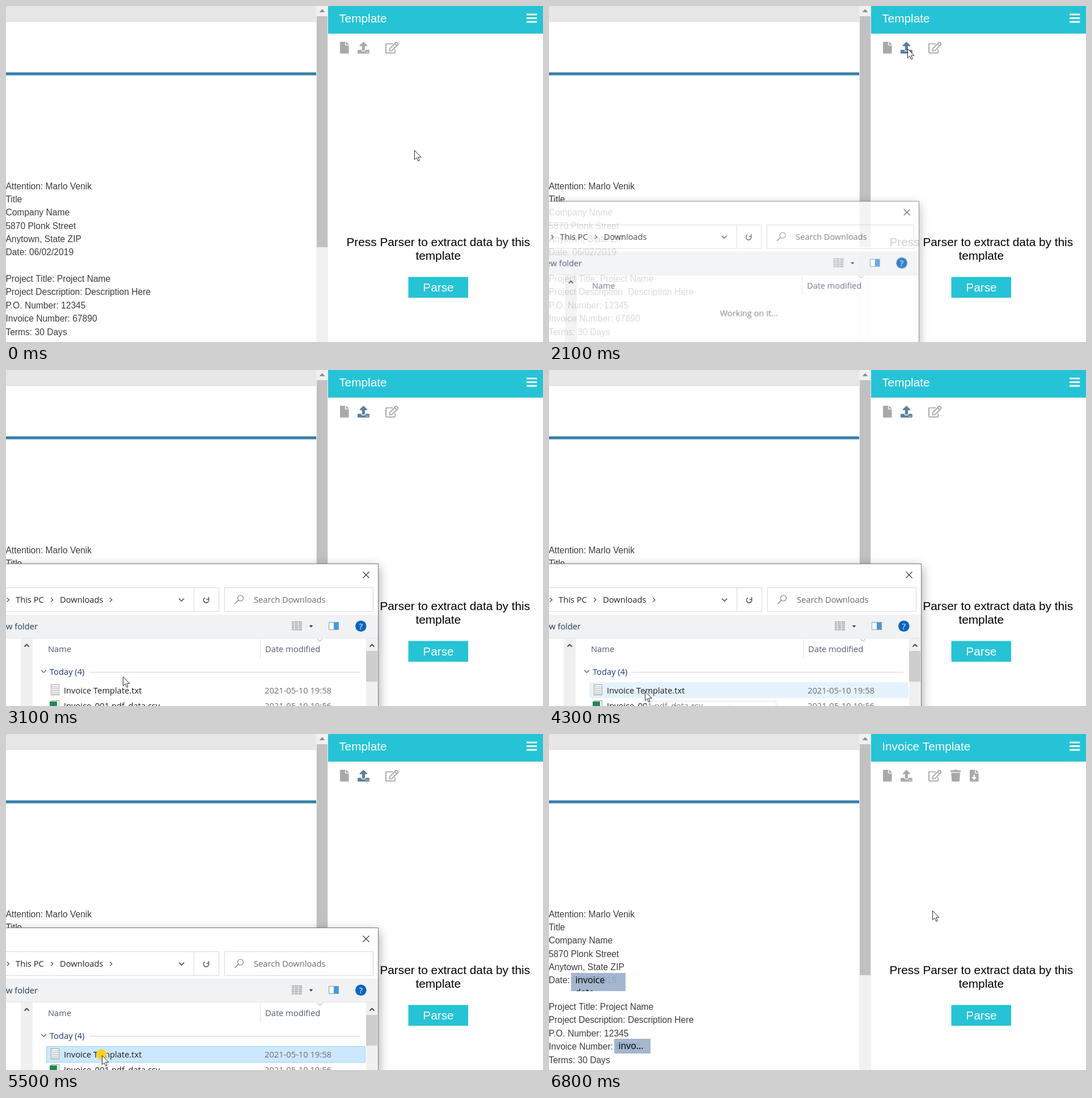
Animation, 947 px wide and 592 px high, one loop 7.7 s. Source, as an HTML page with a canvas:

```html
<!DOCTYPE html>
<html lang="en">
<head>
<meta charset="utf-8">
<title>Loading a template</title>
<style>
  html, body { margin: 0; width: 100%; height: 100%; overflow: hidden; background: #fff; }
  canvas { display: block; }
</style>
</head>
<body>
<canvas id="stage" width="947" height="592"></canvas>
<script>
const LOOP = 7700, STEP = 100, PAD = 100;
const SANS = '"Liberation Sans", Arial, sans-serif';
const UI = '"Open Sans", "Noto Sans", sans-serif';
const TEAL = '#26c3d6', GREY = '#a9a9ab', SLATE = '#5c7f99', YELLOW = '#fcd02c';

const stage = document.getElementById('stage').getContext('2d');
const layer = document.createElement('canvas');
layer.width = 947 + PAD;
layer.height = 592 + PAD;
const dialog = layer.getContext('2d');

const ICONS = {
  file: new Path2D('M0 1Q0 0 1 0H9V5.5Q9 6.5 10 6.5H15.6V19.8Q15.6 20.8 14.6 20.8H1Q0 20.8 0 19.8ZM10.4 0Q11 0 11.4 .4L15.2 4.2Q15.6 4.6 15.6 5.2H10.4Z'),
  upload: new Path2D('M10.4 0L17.2 6.6Q17.6 7.8 16.6 7.8H13V14.6Q13 15.6 12 15.6H8.8Q7.8 15.6 7.8 14.6V7.8H4.2Q3.2 7.8 3.6 6.6ZM1 14.3H6.5Q6.7 16.9 8.8 16.9H12Q14.1 16.9 14.3 14.3H19.8Q20.8 14.3 20.8 15.3V19.8Q20.8 20.8 19.8 20.8H1Q0 20.8 0 19.8V15.3Q0 14.3 1 14.3Z'),
  edit: new Path2D('M13 3.6H2Q1 3.6 1 4.6V18.8Q1 19.8 2 19.8H16.2Q17.2 19.8 17.2 18.8V13.5M7.5 16L7.9 11.9L17.9 1.7Q19.3 .4 20.6 1.7L21.8 2.9Q23.1 4.2 21.8 5.5L11.6 15.6ZM17 4L19.4 6.4'),
  trash: new Path2D('M0 2Q0 1.3 .7 1.3H5.5L6.3 0H11.9L12.7 1.3H17.5Q18.2 1.3 18.2 2V3.9H0ZM1.3 5.2H16.9L16 19Q15.9 20.8 14.1 20.8H4.1Q2.3 20.8 2.2 19Z'),
  down: new Path2D('M6.5 9.1H9.1V13H12.4L7.8 18.2L3.2 13H6.5Z'),
  arrow: new Path2D('M.5 .5V16.6L4.2 13.2L6.8 19.2L9.2 18.1L6.7 12.3H12Z'),
  move: movePath()
};

const DOC_LINES = [
  'Attention: Marlo Venik', 'Title', 'Company Name', '5870 Plonk Street',
  'Anytown, State ZIP', 'Date: 06/02/2019', '',
  'Project Title: Project Name', 'Project Description: Description Here',
  'P.O. Number: 12345', 'Invoice Number: 67890', 'Terms: 30 Days'
];

// [time, x, y]
const GLIDE = [
  [2400, 632, 75], [2500, 570, 118], [2600, 450, 212], [2700, 335, 319],
  [2800, 283, 402], [2900, 246, 466], [3000, 222, 511], [3100, 206, 540],
  [3200, 196, 556], [3300, 177, 563], [3400, 169, 566]
];
const CLICKS = [1500, 5100, 5500], CLICK_LENGTH = 300;

function movePath() {
  const arm = [[-2, -2], [-2, -7.5], [-5.5, -7.5], [0, -13], [5.5, -7.5], [2, -7.5]];
  const path = new Path2D();
  for (let k = 0; k < 4; k++) {
    const cos = [1, 0, -1, 0][k], sin = [0, 1, 0, -1][k];
    for (const [x, y] of arm) path.lineTo(x * cos - y * sin, x * sin + y * cos);
  }
  path.closePath();
  return path;
}

function rect(c, x, y, w, h, fill, border) {
  if (fill) { c.fillStyle = fill; c.fillRect(x, y, w, h); }
  if (border) {
    c.strokeStyle = border;
    c.lineWidth = 1;
    c.strokeRect(x + .5, y + .5, w - 1, h - 1);
  }
}

function line(c, points, color, width = 1) {
  c.beginPath();
  for (const [x, y] of points) c.lineTo(x, y);
  c.strokeStyle = color;
  c.lineWidth = width;
  c.stroke();
}

function text(c, str, x, baseline, size, color, family, align = 'left') {
  c.font = `${size}px ${family}`;
  c.textAlign = align;
  c.fillStyle = color;
  c.fillText(str, x, baseline);
}

const label = (str, x, midY, color, align) => text(dialog, str, x, midY + 5.2, 14.7, color, UI, align);

function disc(c, x, y, r, color) {
  c.beginPath();
  c.arc(x, y, r, 0, 2 * Math.PI);
  c.fillStyle = color;
  c.fill();
}

function chevron(c, x, y, dir, size, color, width = 1.4) {
  const shape = {
    up: [[-1, .5], [0, -.5], [1, .5]],
    down: [[-1, -.5], [0, .5], [1, -.5]],
    right: [[-.5, -1], [.5, 0], [-.5, 1]]
  }[dir];
  line(c, shape.map(([a, b]) => [x + a * size, y + b * size]), color, width);
}

function triangle(c, x, y, half, height, color) {
  c.beginPath();
  c.moveTo(x - half, y);
  c.lineTo(x + half, y);
  c.lineTo(x, y + height);
  c.fillStyle = color;
  c.fill();
}

function icon(c, path, x, y, color, outline) {
  c.save();
  c.translate(x, y);
  if (color) { c.fillStyle = color; c.fill(path); }
  if (outline) { c.strokeStyle = outline.color; c.lineWidth = outline.width; c.stroke(path); }
  c.restore();
}

function drawDocument(c, loaded) {
  rect(c, 0, 0, 947, 592, '#fff');
  rect(c, 0, 0, 547, 27, '#e7e7e7');
  rect(c, 0, 27, 547, 1, '#dadada');
  rect(c, 0, 116.7, 547, 5.6, '#5a97ba');
  rect(c, 0, 118, 547, 3, '#317ca6');
  DOC_LINES.forEach((str, i) => text(c, str, -.6, Math.round(322.6 + i * 23.36), 15.6, '#3c3c3c', SANS));
  if (loaded) {
    field(c, 39, 421, 96, 32, ['invoice', 'date']);
    field(c, 115, 537, 64, 26, ['invo...']);
  }
  rect(c, 547, 0, 21, 592, '#f1f1f1');
  rect(c, 548, 18, 19, 407, '#c1c1c1');
  triangle(c, 557.5, 11, 5, -5.5, '#8c8c8c');
}

function field(c, x, y, w, h, lines) {
  c.save();
  c.beginPath();
  c.rect(x, y, w, h);
  c.clip();
  rect(c, x, y, w, h, 'rgba(154,176,201,.9)');
  lines.forEach((str, i) => text(c, str, x + 7.5, y + 18 + i * 22, 15.9, '#000', UI));
  c.restore();
}

function drawPanel(c, loaded, hover) {
  rect(c, 568, 0, 379, 48.7, TEAL);
  text(c, loaded ? 'Invoice Template' : 'Template', 587.2, 29, 20.8, '#fff', SANS);
  for (const y of [13.5, 20, 26.5]) rect(c, 918, y, 18.2, 2.9, '#fff');

  icon(c, ICONS.file, 589, 63, GREY);
  icon(c, ICONS.upload, 620, 63, hover ? SLATE : GREY);
  disc(c, 635.4, 81.4, .8, '#fff');
  disc(c, 638, 81.4, .8, '#fff');
  icon(c, ICONS.edit, 669, 63, null, { color: GREY, width: 1.95 });
  if (loaded) {
    icon(c, ICONS.trash, 708, 63, GREY);
    icon(c, ICONS.file, 742, 63, GREY);
    icon(c, ICONS.down, 742, 63, '#fff');
  }

  text(c, 'Press Parser to extract data by this', 762.3, 422.5, 20.8, '#000', SANS, 'center');
  text(c, 'template', 762.3, 446.5, 20.8, '#000', SANS, 'center');
  rect(c, 709.5, 477.4, 105.5, 36.6, TEAL);
  text(c, 'Parse', 762.5, 502.6, 20.8, '#fff', SANS, 'center');
}

function drawDialogBars(d, listed) {
  d.save();
  d.shadowColor = 'rgba(0,0,0,.38)';
  d.shadowBlur = 18;
  d.shadowOffsetY = 5;
  rect(d, -140, 342, 797, 400, '#fff');
  d.restore();
  rect(d, -140, 341, 797, 400, null, '#777');
  line(d, [[629.5, 355.5], [640.5, 366.5]], '#333', 1.1);
  line(d, [[640.5, 355.5], [629.5, 366.5]], '#333', 1.1);

  rect(d, -130, 383, 506, 43, null, '#d9d9d9');
  rect(d, 331, 384, 1, 41, '#d9d9d9');
  rect(d, 385, 383, 263, 43, null, '#d9d9d9');
  chevron(d, 3.5, 405, 'right', 3.6, '#555');
  label('This PC', 17, 405, '#222');
  chevron(d, 81, 405, 'right', 3.6, '#555');
  label('Downloads', 95, 405, '#222');
  if (listed) chevron(d, 185, 405, 'right', 3.6, '#555');
  chevron(d, 309.5, 405, 'down', 4.5, '#666', 1.8);

  d.beginPath();
  d.arc(353, 405.5, 4.6, -.5, 4.2);
  d.strokeStyle = '#555';
  d.lineWidth = 1.6;
  d.stroke();
  line(d, [[353.5, 404], [357.5, 404], [357.5, 400]], '#555', 1.5);

  d.beginPath();
  d.arc(413.5, 402, 5, 0, 2 * Math.PI);
  d.strokeStyle = '#777';
  d.lineWidth = 1.1;
  d.stroke();
  line(d, [[410, 405.5], [403.5, 412]], '#777', 1.2);
  label('Search Downloads', 437, 405, '#6a6a6a');

  rect(d, -130, 431, 786, 41, '#f0f2f4');
  rect(d, -130, 472, 786, 1, '#e3e5e7');
  label('New folder', 56, 452, '#1e3956', 'right');
  for (let row = 0; row < 5; row++) {
    for (const [x, w] of [[504, 4], [509, 6], [516, 6]]) rect(d, x, 443 + row * 3.4, w, 2, '#a4a8ac');
  }
  triangle(d, 538, 450, 3.5, 3.5, '#1e3956');
  rect(d, 569, 444, 18, 14, '#fff', '#8e9aa5');
  rect(d, 578, 445, 8, 12, '#3f9be0');
  disc(d, 625.8, 451.3, 9.8, '#0c64c0');
  text(d, '?', 625.8, 456.8, 15, '#fff', UI, 'center');
}

function drawDialogList(d, listed, row) {
  rect(d, 26, 473, 21, 260, '#f0f0f0');
  chevron(d, 36.5, 485.5, 'up', 4, '#444', 1.8);
  label('Name', 74, 492, '#4c5c74');
  rect(d, 448, 474, 1, 34, '#e3e3e3');
  label('Date modified', 457, 492, '#4c5c74');
  chevron(d, 553.5, 476, 'down', 4, '#888', 1);
  if (!listed) {
    label('Working on it...', 302, 540.5, '#6b6b6b');
    return;
  }
  rect(d, 635, 473, 21, 260, '#f0f0f0');
  chevron(d, 645.5, 485.5, 'up', 4, '#444', 1.8);
  rect(d, 635, 495, 20, 54, '#cdcdcd');

  chevron(d, 66.5, 531, 'down', 4.5, '#555', 1.1);
  label('Today (4)', 77, 532, '#1f3675');
  rect(d, 147, 532, 478, 1, '#d2d2d2');

  if (row === 'hover') rect(d, 71, 550, 563, 28, '#e5f3ff');
  if (row === 'selected') rect(d, 71, 550, 563, 29, '#cce8ff', '#99d1ff');
  rect(d, 79, 554, 15, 19, '#fff', '#9a9a9a');
  for (let y = 558; y < 571; y += 3) rect(d, 81, y, 11, 1, '#a5a5a5');
  label('Invoice Template.txt', 102, 565, '#1c1c1c');
  label('2021-05-10 19:58', 456, 565, '#6d6d6d');
  rect(d, 80, 582, 14, 19, '#fff', '#9a9a9a');
  rect(d, 77, 584, 13, 13, '#1f8a4c');
  label('Invoice_001.pdf_data.csv', 102, 592, '#1c1c1c');
  label('2021-05-10 19:56', 456, 592, '#6d6d6d');
}

function drawTooltip(d, alpha) {
  d.save();
  d.globalAlpha = alpha;
  rect(d, 172, 583, 229, 70, '#fff', '#c3b9c0');
  label('Type: Text Document', 179, 596, '#575757');
  d.restore();
}

// Scale is anchored on the centre of the whole window, which sits partly below the stage.
function drawDialog(c, t) {
  const [alpha, scale] =
    t < 2100 ? [.3, .955] :
    t < 2200 ? [.81, .99] :
    t < 2300 ? [.97, .998] :
    t < 5600 ? [1, 1] :
    t < 5700 ? [.5, .975] : [.05, .9525];
  const listed = t >= 2500;
  const row = t >= 5100 ? 'selected' : t >= 3200 ? 'hover' : '';

  dialog.setTransform(1, 0, 0, 1, 0, 0);
  dialog.clearRect(0, 0, layer.width, layer.height);
  dialog.translate(PAD, 0);
  drawDialogBars(dialog, listed);
  drawDialogList(dialog, listed, row);
  if (t >= 4300 && t < 5100) drawTooltip(dialog, Math.min(1, .45 + (t - 4300) / 700));

  c.save();
  c.globalAlpha = alpha;
  c.translate(256, 600);
  c.scale(scale, scale);
  c.drawImage(layer, -256 - PAD, -600);
  c.restore();
}

function between(t, start, end, from, to) {
  const u = Math.max(0, Math.min(1, (t - start) / (end - start)));
  const e = u * u * (3 - 2 * u);
  return from.map((v, i) => v + (to[i] - v) * e);
}

function pointer(t) {
  if (t <= 2400) return between(t, 400, 1100, [720, 254], [632, 75]);
  if (t < 3400) {
    const i = GLIDE.findIndex(p => p[0] > t);
    const [t0, x0, y0] = GLIDE[i - 1], [t1, x1, y1] = GLIDE[i];
    const u = (t - t0) / (t1 - t0);
    return [x0 + (x1 - x0) * u, y0 + (y1 - y0) * u];
  }
  return between(t, 6200, 6800, [169, 566], [676, 311]);
}

function drawPointer(c, t, loaded) {
  const [x, y] = pointer(t).map(Math.round);
  const outline = { color: '#2b2b33', width: 1 };
  const overField = loaded && x < 179;
  if (overField) icon(c, ICONS.move, x - .5, y - 2.5, '#fff', outline);

  const click = CLICKS.find(start => t >= start && t < start + CLICK_LENGTH);
  if (click !== undefined) disc(c, x - .5, y - 1.5, 9.3 - (t - click) / 60, YELLOW);
  if (!overField) icon(c, ICONS.arrow, x, y, '#fff', outline);
}

function render(now) {
  const t = Math.floor((now % LOOP) / STEP) * STEP;
  const loaded = t >= 5600;
  drawDocument(stage, loaded);
  drawPanel(stage, loaded, t >= 1000 && !loaded);
  if (t >= 2000 && t < 5800) drawDialog(stage, t);
  drawPointer(stage, t, loaded);
}

const start = performance.now();
function tick() {
  render(performance.now() - start);
  requestAnimationFrame(tick);
}
tick();
</script>
</body>
</html>
```
